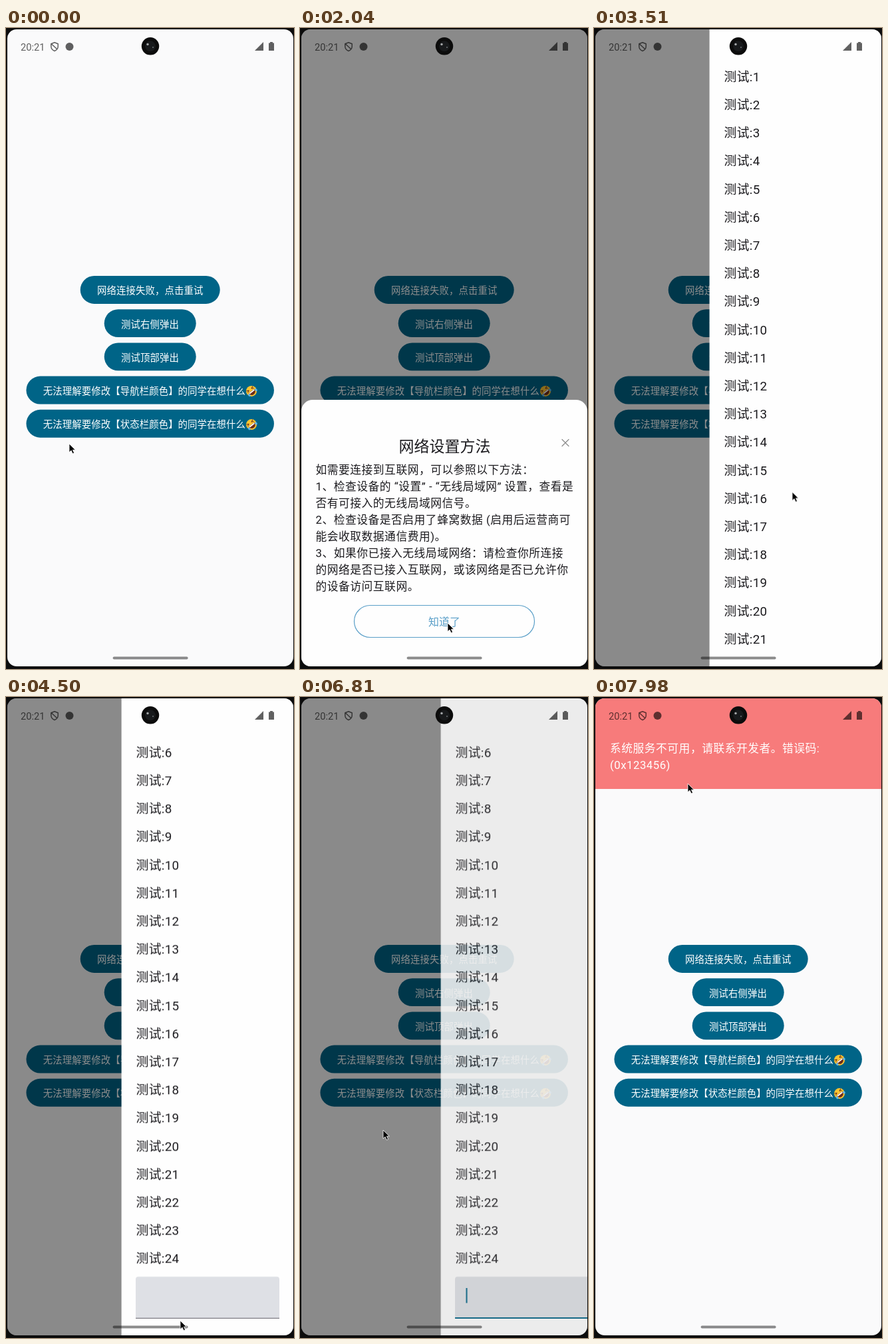
Recreate the animation shown at these times as an HTML page. Size 433 px wide and 962 px high, loop 8 s.

```html
<!DOCTYPE html>
<html lang="zh-CN">
<head>
<meta charset="utf-8">
<title>弹出面板演示</title>
<style>
html, body { margin: 0; width: 100%; height: 100%; overflow: hidden; background: #0c0c0c; }
svg { display: block; width: 100vw; height: 100vh; }
text { font-family: Roboto, "Noto Sans CJK SC", "Noto Sans CJK", sans-serif; white-space: pre; }
.mid { text-anchor: middle; }
.body { font-size: 16.75px; letter-spacing: .52px; }
.label { font-size: 14.4px; letter-spacing: .1px; fill: #fff; }
.item { font-size: 18.85px; letter-spacing: .3px; fill: #1c1b1f; }
.line { fill: none; stroke-linecap: round; stroke-linejoin: round; }

.move { animation: 8s cubic-bezier(.4, 0, .2, 1) infinite; }
#scrim { animation-name: scrim; }
#sheet { animation-name: sheet; }
#drawer { animation-name: drawer; }
#list { animation-name: list; }
#keyboard { animation-name: keyboard; }
#banner { animation-name: banner; }
#pointer { animation-name: pointer; animation-timing-function: ease-in-out; }
#focus { animation-name: focus; animation-timing-function: step-end; }
#caret { animation-name: caret; animation-timing-function: step-end; }

@keyframes scrim {
  0%, 10.6% { opacity: 0 }
  13.5%, 25.9% { opacity: 1 }
  29.5%, 35.6% { opacity: 0 }
  39%, 85.2% { opacity: 1 }
  88.5%, 100% { opacity: 0 }
}
@keyframes sheet {
  0%, 10.75% { transform: translateY(360px); opacity: 1; animation-timing-function: cubic-bezier(.3, .3, .7, .9) }
  14.25% { transform: none; opacity: 1; animation-timing-function: ease-out }
  17.5%, 25.9% { transform: translateY(-46px); opacity: 1 }
  30%, 100% { transform: translateY(360px); opacity: 0 }
}
@keyframes drawer {
  0%, 35.75% { transform: translateX(260px); opacity: 0 }
  39.5%, 84% { transform: none; opacity: 1; animation-timing-function: ease-in }
  85.125% { transform: translateX(36.6px); opacity: .85; animation-timing-function: ease-out }
  88.5%, 100% { transform: translateX(260px); opacity: 0 }
}
@keyframes list {
  0%, 42.5% { transform: translateY(243px); animation-timing-function: ease-in-out }
  47% { transform: translateY(30px); animation-timing-function: ease-out }
  50%, 61.25% { transform: none }
  65%, 75.25% { transform: translateY(-327px) }
  78.75%, 90% { transform: none; animation-timing-function: step-end }
  100% { transform: translateY(243px) }
}
@keyframes keyboard {
  0%, 61.25% { transform: translateY(356px) }
  65%, 75.25% { transform: none }
  78.75%, 100% { transform: translateY(356px) }
}
@keyframes banner {
  0%, 92.5% { transform: translateY(-140px); opacity: 0 }
  96.5%, 100% { transform: none; opacity: 1 }
}
@keyframes focus {
  0% { opacity: 0 }
  58.875% { opacity: 1 }
  90%, 100% { opacity: 0 }
}
@keyframes caret {
  0%, 65.125%, 77.625%, 90%, 100% { opacity: 0 }
  58.875%, 71.375%, 83.875% { opacity: 1 }
}
@keyframes pointer {
  0% { transform: translate(95px, 624px) }
  9.5%, 17% { transform: translate(206px, 388px) }
  23%, 26.5% { transform: translate(222px, 893px) }
  33%, 36.5% { transform: translate(220px, 422px) }
  41%, 42.5% { transform: translate(300px, 740px) }
  47%, 50% { transform: translate(290px, 520px) }
  56.25% { transform: translate(262px, 936px) }
  58%, 62% { transform: translate(250px, 905px) }
  73%, 76.5% { transform: translate(77px, 932px) }
  81.5%, 86% { transform: translate(125px, 650px) }
  90.75%, 94% { transform: translate(222px, 495px); animation-timing-function: ease-out }
  99.75%, 100% { transform: translate(141px, 130px) }
}
</style>
</head>
<body>
<svg viewBox="0 0 433 962">
  <defs>
    <clipPath id="glass"><rect x="2" y="2" width="430" height="956" rx="14"/></clipPath>
    <clipPath id="listArea"><rect x="173" y="52" width="260" height="882"/></clipPath>
    <g id="laugh">
      <circle r="8" fill="#fcc431"/>
      <g transform="rotate(-38)">
        <path d="M-5.5 0H5.5Q5 6 0 6T-5.5 0Z" fill="#6b2b1b"/>
        <path d="M-5 .2H5L4.4 2H-4.4Z" fill="#fff"/>
        <path class="line" d="M-5.5-4.5L-2.5-3L-5.5-1.7M5.5-4.5L2.5-3L5.5-1.7" stroke="#6b2b1b"/>
        <path d="M-7.5 1Q-9 5-6.5 5T-5.5 1ZM7.5 1Q9 5 6.5 5T5.5 1Z" fill="#58b4ec"/>
      </g>
    </g>
  </defs>

  <g clip-path="url(#glass)">
    <rect width="433" height="962" fill="#fafafb"/>
    <g id="buttons"></g>
    <rect id="scrim" class="move" width="433" height="962" fill="#000" fill-opacity=".45"/>

    <g id="sheet" class="move">
      <rect x="2" y="604" width="430" height="460" rx="17" fill="#fefefe"/>
      <text class="mid" x="217.5" y="682" font-size="23" fill="#1c1b1f">网络设置方法</text>
      <path class="line" d="M394 663.5l10 10m0-10l-10 10" stroke="#8b8b8b" stroke-width="1.2"/>
      <g id="help" class="body" fill="#1c1b1f"></g>
      <rect x="81.5" y="912.5" width="271" height="48" rx="24" fill="none" stroke="#5a9fc8" stroke-width="1.2"/>
      <text class="mid" x="217" y="943" font-size="16" fill="#5a9fc8">知道了</text>
    </g>

    <g id="drawer" class="move">
      <rect x="173.6" width="260" height="962" fill="#fefefe"/>
      <g clip-path="url(#listArea)">
        <g id="list" class="move">
          <g id="items"></g>
          <path d="M195 933V874q0-4 4-4H407q4 0 4 4V933Z" fill="#dee0e5"/>
          <path d="M195 932.5H411" stroke="#49454f"/>
          <path id="focus" class="move" d="M195 932H411" stroke="#006487" stroke-width="2"/>
          <path id="caret" class="move" d="M212.5 887V909.5" stroke="#006487" stroke-width="2"/>
        </g>
      </g>
    </g>

    <g id="banner" class="move">
      <rect width="433" height="138" fill="#f77b7b"/>
      <g class="body" fill="#fff">
        <text x="24" y="83">系统服务不可用，请联系开发者。错误码:</text>
        <text x="24" y="108">(0x123456)</text>
      </g>
    </g>

    <g id="keyboard" class="move" fill="#1d1f22">
      <rect y="606" width="433" height="356" fill="#ecebef"/>
      <circle cx="25.5" cy="629" r="16" fill="#74cfff"/>
      <path class="line" d="M23.5 624.5l4.5 4.5l-4.5 4.5" stroke="#123" stroke-width="2"/>
      <rect x="142" y="613" width="158" height="32.5" rx="8" fill="#fefefe" stroke="#dcdce0"/>
      <path class="line" d="M157 637h-3.5v-14h14v4M157.5 623v3h6v-3M161 632.5h-1a2.5 2.5 0 0 0 0 5h1M165 632.5h1a2.5 2.5 0 0 1 0 5h-1M161 635h4" stroke="#4fb2e4" stroke-width="1.6"/>
      <text x="175.5" y="635.5" font-size="15">https://pix.vo...</text>
      <rect x="405" y="619.5" width="6" height="12" rx="3"/>
      <path class="line" d="M401.8 629a6.2 6.2 0 0 0 12.4 0M408 635.5v3.5" stroke="#1d1f22" stroke-width="1.8"/>
      <g id="keys"></g>
      <path d="M62.3 670V728" stroke="#777b80" stroke-width="1.5"/>
      <g class="mid" font-size="18">
        <text x="36" y="697" font-size="20">?</text>
        <text x="36" y="738" font-size="20">!</text>
        <text x="36" y="779">...</text>
        <text x="36" y="817">～</text>
        <text x="36" y="878" font-weight="500">?123</text>
        <text x="89.5" y="881">,</text>
        <text x="238" y="876" font-size="13.5">拼音</text>
        <text x="399" y="835" font-size="7.5">123</text>
      </g>
      <circle cx="345" cy="880" r="2.8" fill="none" stroke="#1d1f22" stroke-width="1.3"/>
      <g class="line" stroke="#1d1f22" stroke-width="1.8">
        <path d="M391 680.5H410V697.5H391L385.5 689ZM396 685.5l7 7m0-7l-7 7"/>
        <path d="M398.5 801L409 812H404V821.5H393V812H388Z"/>
        <path d="M408 865v6.5H389m5-5l-5 5l5 5"/>
        <circle cx="131.5" cy="871" r="9.5"/>
        <ellipse cx="131.5" cy="871" rx="4.3" ry="9.5"/>
        <path d="M123 867.5h17m-17 7h17"/>
        <g stroke-width="1.2">
          <circle cx="89.5" cy="857.5" r="5.5"/>
          <path d="M86.5 859q3 3.5 6 0M87.5 855.5v.3m4-.3v.3"/>
        </g>
      </g>
      <path d="M398.5 740l3.5 4.5h-7zM398.5 761l3.5-4.5h-7zM388 750.5l4.5-3.5v7zM409 750.5l-4.5-3.5v7z"/>
      <circle cx="398.5" cy="750.5" r="1.6"/>
      <path class="line" d="M62.5 930.5l4.5 4.5l4.5-4.5" stroke="#8d9095" stroke-width="1.5"/>
      <path d="M360 929.5h16m-16 3.5h16" stroke="#9a9ca1" stroke-width="2" stroke-dasharray="2 1.5"/>
      <path d="M364 937h8" stroke="#9a9ca1" stroke-width="1.8"/>
    </g>

    <g fill="#000" opacity=".62">
      <text x="22" y="33.5" font-size="14.7">20:21</text>
      <path class="line" d="M73 21.8l5.2 2v4q0 4.5-5.2 6.7q-5.2-2.2-5.2-6.7v-4ZM69 24.5l7.5 7" stroke="#000" stroke-width="1.5"/>
      <circle cx="95.5" cy="28" r="6"/>
      <path d="M374 34H387V21Z"/>
      <path d="M397 21h4v1.5h2V34h-8V22.5h2Z"/>
    </g>
    <rect x="160.6" y="943.5" width="113" height="4" rx="2" opacity=".45"/>
    <circle cx="217" cy="27.3" r="13.2" fill="#0c0c0c"/>
    <circle cx="217" cy="27.3" r="8" fill="#181a1c"/>
    <circle cx="213" cy="24.5" r="1.7" fill="#a5a8aa"/>
    <circle cx="221" cy="29" r="1" fill="#70777a"/>
    <path id="pointer" class="move" d="M0 0V12.8L3 10L5.2 14.8L7.5 13.8L5.4 9.2H9.3Z" stroke="#fff" stroke-width=".8"/>
  </g>
</svg>
<script>
const svgNS = 'http://www.w3.org/2000/svg';

function add(parentId, tag, attrs, content = '') {
  const node = document.createElementNS(svgNS, tag);
  for (const name in attrs) node.setAttribute(name, attrs[name]);
  node.textContent = content;
  document.getElementById(parentId).append(node);
}

// Main page buttons: label, width, ends with an emoji
[
  ['网络连接失败，点击重试', 210],
  ['测试右侧弹出', 138],
  ['测试顶部弹出', 138],
  ['无法理解要修改【导航栏颜色】的同学在想什么', 372.5, true],
  ['无法理解要修改【状态栏颜色】的同学在想什么', 372.5, true]
].forEach(([label, width, emoji], i) => {
  const x = 216.7 - width / 2, y = 372 + i * 50.2;
  add('buttons', 'rect', { x, y, width, height: 41.9, rx: 20.95, fill: '#006487' });
  add('buttons', 'text', { class: 'label', x: x + 25.3, y: y + 27.4 }, label);
  if (emoji) add('buttons', 'use', { href: '#laugh', x: 369, y: y + 22.3 });
});

[
  '如需要连接到互联网，可以参照以下方法：',
  '1、检查设备的 “设置” - “无线局域网” 设置，查看是',
  '否有可接入的无线局域网信号。',
  '2、检查设备是否启用了蜂窝数据 (启用后运营商可',
  '能会收取数据通信费用)。',
  '3、如果你已接入无线局域网络：请检查你所连接',
  '的网络是否已接入互联网，或该网络是否已允许你',
  '的设备访问互联网。'
].forEach((line, i) => add('help', 'text', { x: 23.5, y: 714.5 + i * 25.1 }, line));

for (let n = 0; n < 25; n++)
  add('items', 'text', { class: 'item', x: 195.5, y: 90 + (n - 6) * 42.2 }, '测试:' + n);

function key(x, y, width, height, fill, rx = 6) {
  add('keys', 'rect', { x, y: y + 1, width, height, rx, fill: '#d3d5da' });
  add('keys', 'rect', { x, y, width, height, rx, fill });
}

function hint(x, y, digit) {
  add('keys', 'text', { class: 'mid', x, y, 'font-size': 10.5 }, digit);
}

const white = '#fdfdfe', blue = '#cee2f3';
['‘词', 'abc', 'def', 'ghi', 'jkl', 'mno', 'pqrs', 'tuv', 'wxyz'].forEach((label, i) => {
  const x = 70 + i % 3 * 99.6, y = 661 + Math.floor(i / 3) * 61.7;
  key(x, y, 95, 55, white);
  add('keys', 'text', { class: 'mid', x: x + 47, y: y + 37 - (i ? 0 : 2), 'font-size': i ? 23.5 : 20 }, label);
  hint(x + 90, y + 13, i + 1);
});
key(7, 661, 58, 179, blue);
for (let row = 0; row < 3; row++) key(369, 661 + row * 61.7, 59, 55, blue);
key(7, 846, 58, 50, '#a9c9dc', 25);
key(71, 846, 37, 50, blue);
key(113, 846, 37, 50, white);
key(155, 846, 166, 50, white);
key(327, 846, 37, 50, blue);
key(369, 846, 59, 50, '#74cfff', 25);
hint(315, 858, 0);
</script>
</body>
</html>
```
